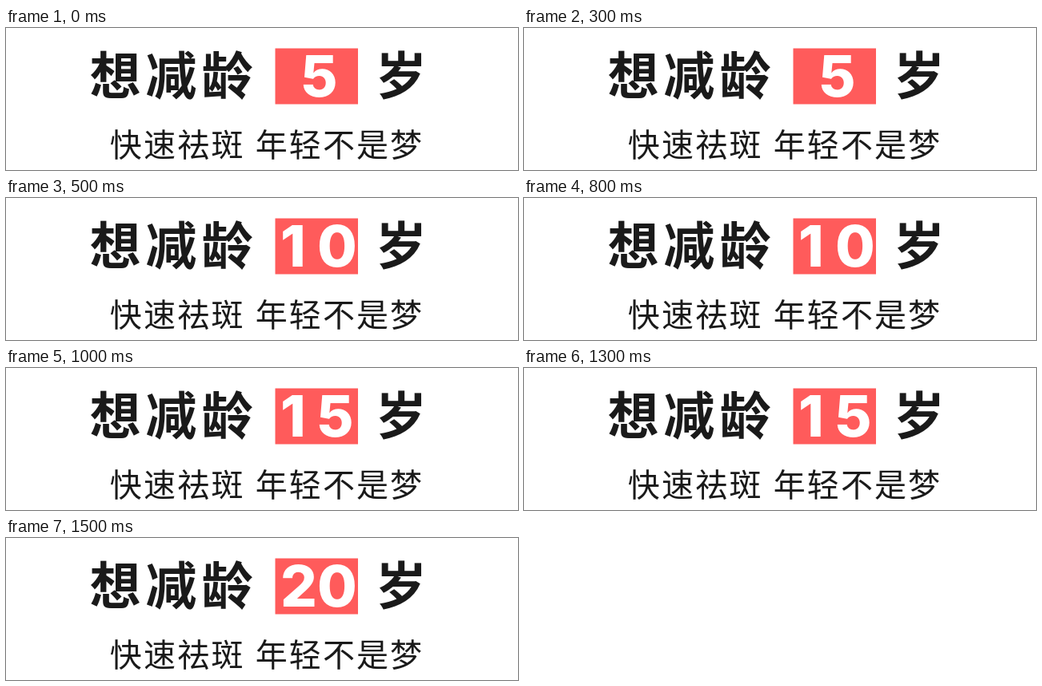
Recreate the animation shown at these times as an HTML page. Size 640 px wide and 178 px high, loop 2 s.

```html
<!DOCTYPE html>
<html lang="zh-CN">
<head>
<meta charset="utf-8">
<style>
  html, body { margin: 0; width: 100%; height: 100%; overflow: hidden; background: #fff; }
  svg { display: block; width: 640px; height: 178px; }
  text { font-family: "Noto Sans CJK SC", "Noto Sans CJK", sans-serif; fill: #1a1a1a; }
  .title { font-size: 64px; font-weight: 700; }
  .tagline { font-size: 40px; font-weight: 350; }
  .age { font: 800 72px Inter, sans-serif; fill: #fff; }
</style>
</head>
<body>
<svg viewBox="0 0 640 178">
  <text class="title" x="104.5 174.5 244.5 462" y="82.5">想减龄岁</text>
  <rect x="336.5" y="25.5" width="103.5" height="70" fill="#ff5b5b"/>
  <text class="age" id="age" y="86"></text>
  <text class="tagline" x="129.7 172 214.3 256.6 311.7 353.8 395.9 438 480" y="160.5">快速祛斑年轻不是梦</text>
</svg>
<script>
  const age = document.getElementById("age");
  const stepMs = 500, steps = 4;

  function draw() {
    const step = Math.floor(performance.now() / stepMs) % steps;
    const years = 5 * (step + 1);
    age.textContent = years;
    age.setAttribute("x", years < 10 ? "369" : "343 389");
    requestAnimationFrame(draw);
  }
  draw();
</script>
</body>
</html>
```
